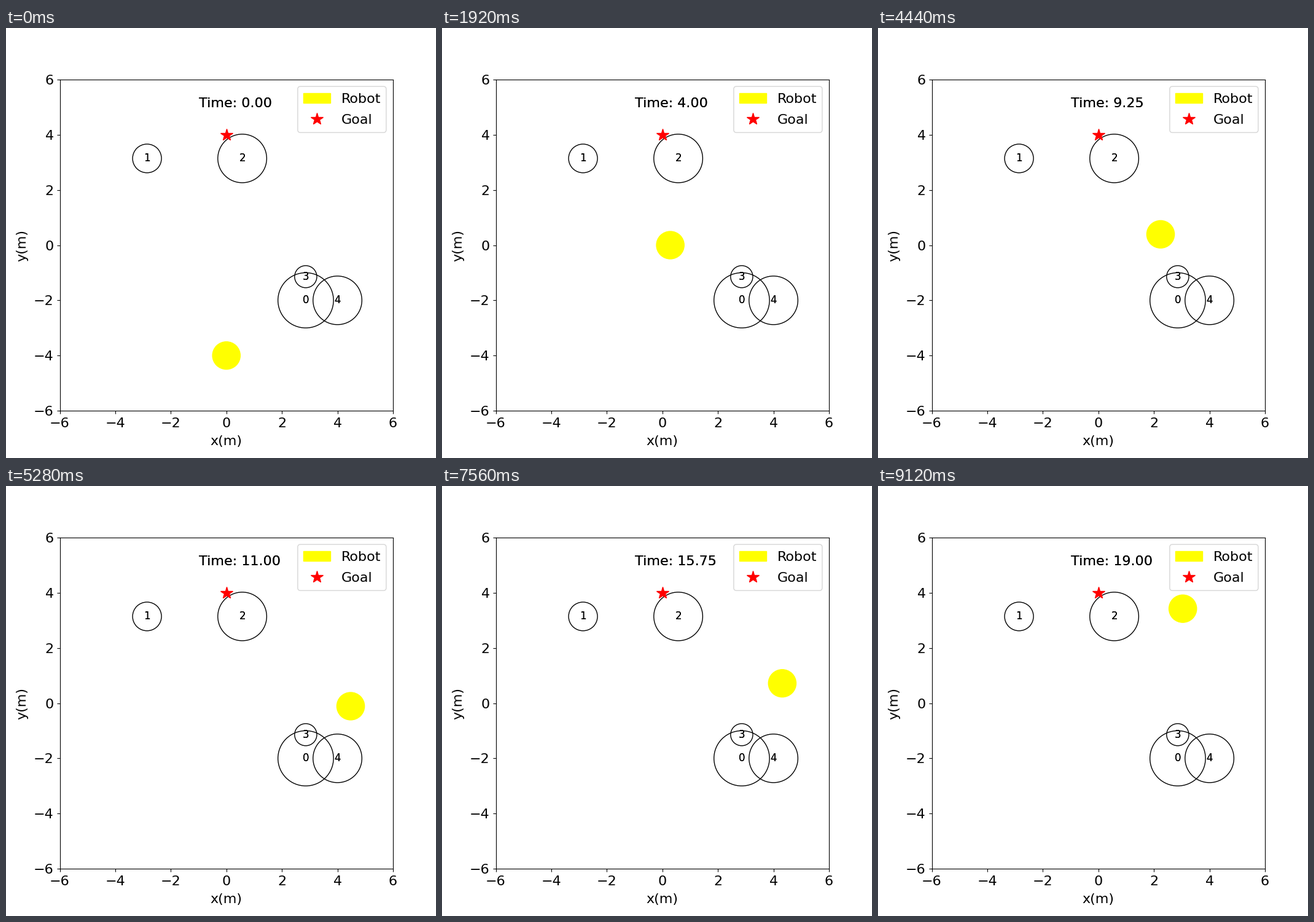
A matplotlib script for the animation above (9240 ms loop, 700 by 700 pixels).

```python
import numpy as np
import matplotlib.pyplot as plt
from matplotlib.animation import FuncAnimation
from matplotlib.lines import Line2D
from matplotlib.patches import Circle, FancyBboxPatch, Rectangle

FRAMES, STEP_MS, DT = 77, 120, 0.25
SIZE = 16
EM = SIZE * 100 / 72  # font size in pixels

# Obstacles: x, y, radius
HUMANS = [(20 / 7, -2, 1), (-20 / 7, 22 / 7, 0.52), (4 / 7, 22 / 7, 0.88),
          (20 / 7, -8 / 7, 0.4), (4, -2, 0.88)]

# Key points of the drive: step, x, y
KEYS = np.array([
    (0, 0, -4), (8, 0.22, -1.8), (16, 0.285, 0),        # up the middle
    (29, 0.47, 0.75), (32, 0.685, 0.755),               # slow, turn right
    (34, 1.3, 0.64), (40, 3.19, 0.14), (44, 4.475, -0.11),
    (48, 4.88, -0.415), (57, 4.93, -0.628),             # stop at the side
    (64, 4.17, 0.985), (68, 3.346, 1.99), (72, 3.045, 3.12), (76, 3.04, 3.424),
])


def glide(t, p, at):
    """Cubic Hermite curve through points p; harmonic slopes avoid overshoot."""
    h = np.diff(t)[:, None]
    d = np.diff(p, axis=0) / h
    both = d[:-1] * d[1:]
    total = np.where(both > 0, d[:-1] + d[1:], 1)
    inner = np.where(both > 0, 2 * both / total, 0)
    m = np.vstack([d[:1], inner, np.zeros((1, 2))])
    i = np.clip(np.searchsorted(t, at, side="right") - 1, 0, len(t) - 2)
    h = h[i]
    u = (at - t[i])[:, None] / h
    ease = u * u * (3 - 2 * u)
    return (p[i] * (1 - ease) + p[i + 1] * ease
            + h * u * (1 - u) * (m[i] * (1 - u) - m[i + 1] * u))


path = glide(KEYS[:, 0], KEYS[:, 1:], np.arange(FRAMES))

fig, ax = plt.subplots(figsize=(7, 7), dpi=100)
fig.subplots_adjust(left=0.125, right=0.9, bottom=0.11, top=0.88)
ax.tick_params(labelsize=SIZE)
ax.tick_params(axis="x", pad=4.2)
ax.set(xlim=(-6, 6), ylim=(-6, 6),
       xticks=range(-6, 7, 2), yticks=range(-6, 7, 2))
ax.set_xlabel("x(m)", fontsize=SIZE, labelpad=6.5)
ax.set_ylabel("y(m)", fontsize=SIZE, labelpad=6.5)


def label(x, y, text, size):
    """Text drawn twice, which gives it a slightly heavier edge."""
    return [ax.text(x, y, text, fontsize=size) for _ in range(2)]


def star(x, y, **kw):
    return Line2D([x], [y], color="red", marker="*", linestyle="None",
                  markersize=15, **kw)


def draw_legend(right=618.9, top=604.9, width=144, height=75.1):
    """Legend box laid out in pixels from its upper right corner."""
    px = dict(transform=None, zorder=5)
    left = right - width
    x = left + 0.4 * EM
    text_x = x + 2.8 * EM
    rows = [top - 26.7, top - 60.7]
    fig.add_artist(FancyBboxPatch(
        (left, top - height), width, height,
        boxstyle=f"round,pad=0,rounding_size={0.2 * EM}",
        fc="white", ec="0.8", alpha=0.8, **px))
    fig.add_artist(Rectangle((x, rows[0]), 2 * EM, 0.7 * EM,
                             color="yellow", **px))
    fig.add_artist(star(x + EM, rows[1] + 0.35 * EM, **px))
    for y, name in zip(rows, ("Robot", "Goal")):
        fig.text(text_x / 700, y / 700, name, fontsize=SIZE, zorder=6)


robot = Circle(path[0], 0.5, color="yellow")
ax.add_artist(robot)
ax.add_artist(star(0, 4))
draw_legend()

for n, (x, y, r) in enumerate(HUMANS):
    ax.add_artist(Circle((x, y), r, fill=False))
    label(x - 0.11, y - 0.11, str(n), 12)

clock = label(-1, 5, "Time: 0.00", SIZE)


def update(k):
    robot.center = tuple(path[k])
    for text in clock:
        text.set_text(f"Time: {k * DT:.2f}")
    return [robot, *clock]


anim = FuncAnimation(fig, update, frames=FRAMES, interval=STEP_MS,
                     repeat=True, repeat_delay=0)
plt.show()
```
